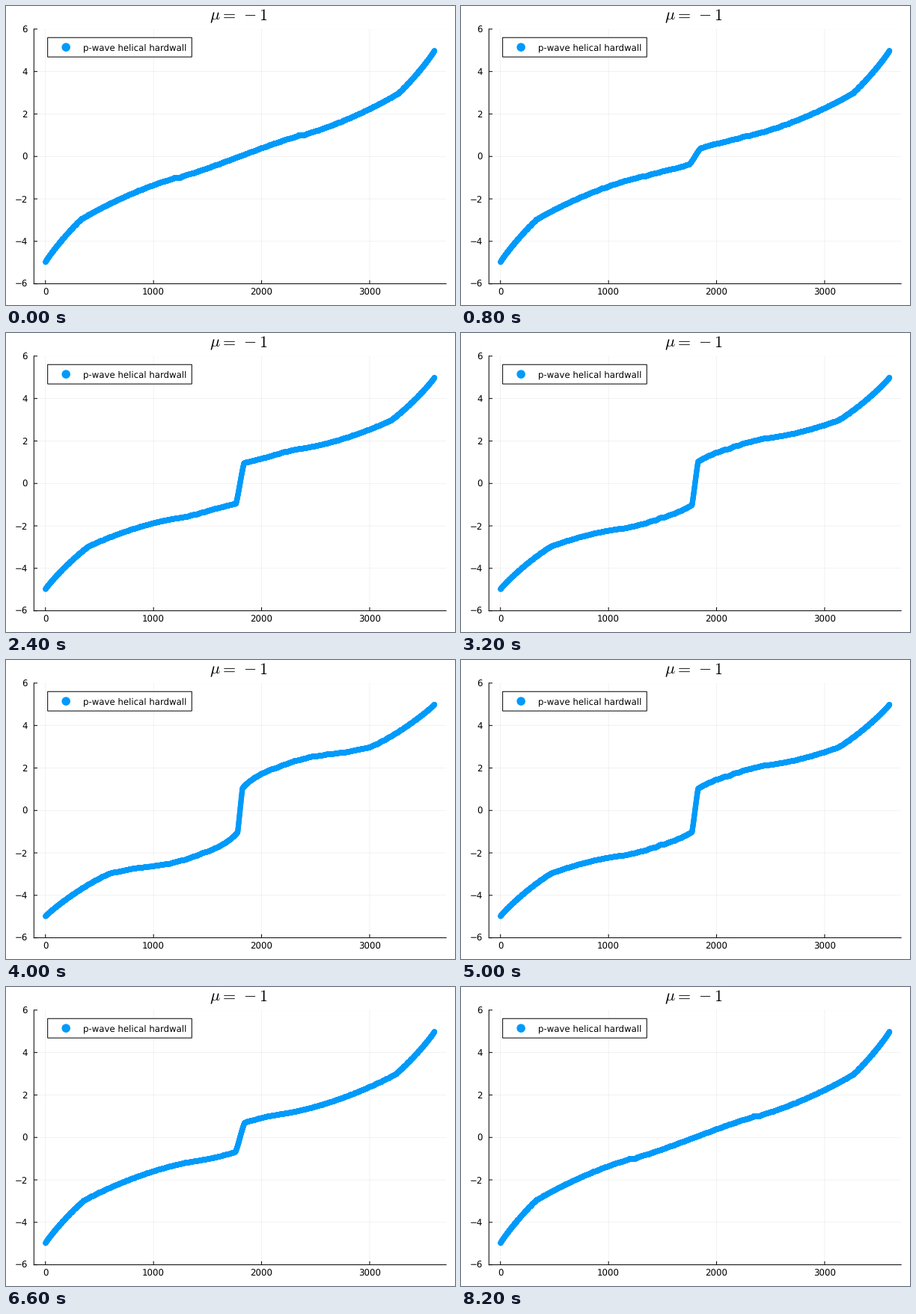
These frames come from a looping animation (600x400 px, 8400 ms). A matplotlib script:

```python
import numpy as np
import matplotlib.pyplot as plt
from matplotlib.animation import FuncAnimation
from matplotlib.patches import Circle, Rectangle

W, H = 600, 400
PT = 0.72                      # points per pixel at 100 dpi
BLUE = "#009afa"
N = 30                         # lattice side
MU = -1
STEPS = 21                     # pairing strengths 0, 0.1 ... 2.0
LEFT, RIGHT, TOP, BOTTOM = 37.3, 588.19, 30.87, 371.61
TICK = 4.72

plt.rcParams["font.family"] = "DejaVu Sans"
plt.rcParams["text.hinting"] = "none"


def lattice():
    """Normal part and unit p-wave pairing on an open square lattice."""
    one, hop = np.eye(N), np.eye(N, k=1)
    hx, hy = np.kron(hop, one), np.kron(one, hop)
    normal = -(hx + hx.T + hy + hy.T) - MU * np.eye(N * N)
    pairing = 0.5 * ((hx - hx.T) + 1j * (hy - hy.T))
    return normal, pairing


def orbits():
    """Site indices of one quadrant under the four quarter turns."""
    x, y = (g.ravel() for g in np.mgrid[:N // 2, :N // 2])
    turns = []
    for _ in range(4):
        turns.append(x * N + y)
        x, y = N - 1 - y, x
    return turns


def sector(matrix, turns, l):
    """Block of a matrix acting on states of angular momentum l."""
    return sum(matrix[np.ix_(turns[0], t)] * 1j ** (l * m % 4)
               for m, t in enumerate(turns))


def spectra():
    normal, pairing = lattice()
    turns = orbits()
    parts = [(sector(normal, turns, l + 1), sector(pairing, turns, l),
              sector(normal, turns, l)) for l in (0, 1)]
    result = []
    for step in range(STEPS):
        delta = 0.1 * step
        half = np.concatenate([
            np.linalg.eigvalsh(np.block([[p, delta * d],
                                         [delta * d.conj().T, -h]]))
            for p, d, h in parts])
        # particle-hole partners, then both spins
        both = np.sort(np.concatenate([half, -half]))
        result.append(np.repeat(both, 2))
    return result


levels = spectra()
count = len(levels[0])
index = np.arange(1, count + 1)
xticks, yticks = range(0, 4000, 1000), range(-6, 7, 2)

fig = plt.figure(figsize=(6, 4), dpi=100, facecolor="white")
ax = fig.add_axes([LEFT / W, 1 - BOTTOM / H,
                   (RIGHT - LEFT) / W, (BOTTOM - TOP) / H])
pad = 0.03 * (count - 1)
ax.set_xlim(1 - pad, count + pad)
ax.set_ylim(-6, 6)
ax.set_xticks(xticks)
ax.set_yticks(yticks)
ax.set_axisbelow(True)
ax.grid(color="black", alpha=0.1, linewidth=0.5 * PT, snap=False)
ax.spines[["top", "right"]].set_visible(False)
for side in ("left", "bottom"):
    ax.spines[side].set(linewidth=PT, snap=False)
ax.tick_params(length=0, labelsize=11.7 * PT)
ax.tick_params(axis="x", pad=6.1 * PT)
ax.tick_params(axis="y", pad=8.3 * PT)

# inward ticks at subpixel positions
style = dict(color="black", linewidth=PT, snap=False, clip_on=False)
ax.vlines(xticks, 0, TICK / (BOTTOM - TOP),
          transform=ax.get_xaxis_transform(), **style)
ax.hlines(yticks, 0, TICK / (RIGHT - LEFT),
          transform=ax.get_yaxis_transform(), **style)

dots = ax.scatter(index, levels[0], s=np.full(count, (7.2 * PT) ** 2),
                  color=BLUE, linewidths=0, zorder=3)

# overlay in pixel coordinates for title and legend
top = fig.add_axes([0, 0, 1, 1])
top.set_xlim(0, W)
top.set_ylim(H, 0)
top.axis("off")
top.text(272.5, 18.8, r"$\mu=\hspace{0.4}{-}\hspace{0.2}1$",
         fontsize=22 * PT, math_fontfamily="cm", va="baseline")
top.add_patch(Rectangle((55.66, 42.23), 192.6, 25.92, facecolor="white",
                        edgecolor="black", linewidth=PT, snap=False))
top.add_patch(Circle((80.2, 55.19), 5.76, color=BLUE, linewidth=0))
top.text(103.3, 59.5, "p-wave helical hardwall",
         fontsize=11.75 * PT, va="baseline")


def draw(i):
    step = min(i, 2 * STEPS - 1 - i)
    dots.set_offsets(np.column_stack([index, levels[step]]))
    return [dots]


anim = FuncAnimation(fig, draw, frames=2 * STEPS, interval=200,
                     repeat=True, repeat_delay=0)
plt.show()
```
